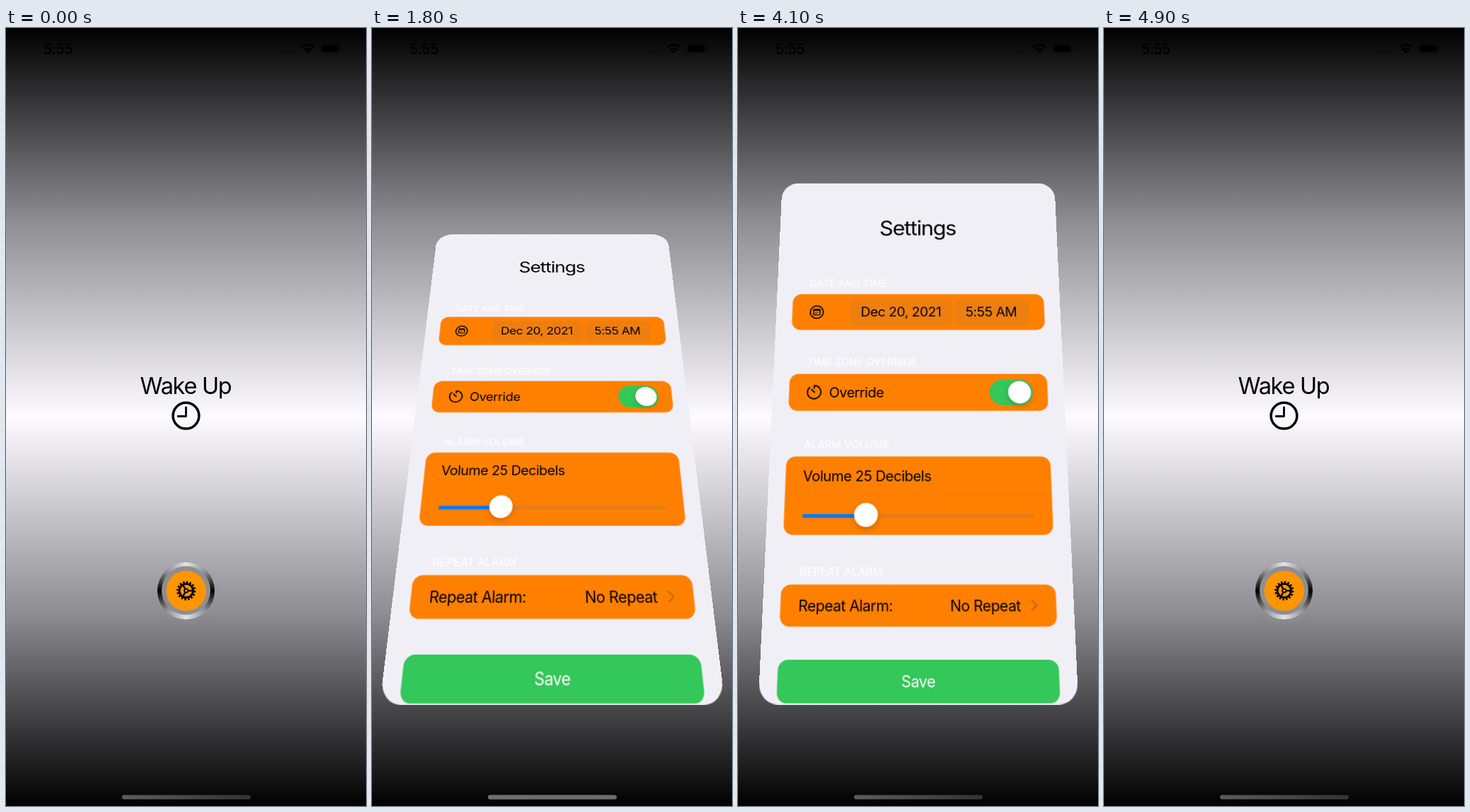
Recreate the animation shown at these times as an HTML page. Size 509x1101 px, loop 5000 ms.

```html
<!DOCTYPE html>
<html lang="en">
<head>
<meta charset="utf-8">
<title>Alarm settings</title>
<style>
  html, body { margin: 0; width: 100%; height: 100%; overflow: hidden; background: #000; }
  #stage {
    position: relative; width: 509px; height: 1101px; overflow: hidden;
    background: linear-gradient(#000, #8e8e93 25%, #fdfbff 50%, #8e8e93 75%, #000);
  }
  #stage > * { position: absolute; }
  svg { display: block; font: 20px Inter, Roboto, sans-serif; letter-spacing: -.025em; }
  #scene { left: 0; top: 0; }
  #ring {
    left: 214px; top: 755.5px; width: 81px; height: 81px; border-radius: 50%;
    background: conic-gradient(#e4e2e6, #8e8e93 12.5%, #000 25%, #8e8e93 37.5%, #e4e2e6 50%,
      #8e8e93 62.5%, #000 75%, #8e8e93 87.5%, #e4e2e6);
    box-shadow: 0 3px 8px rgba(150, 150, 155, .35);
  }
  #card {
    left: 46.5px; top: 187px; border-radius: 26px; overflow: hidden;
    background: #f1eff6; visibility: hidden;
  }
  .title { font-size: 32.5px; letter-spacing: -.04em; text-anchor: middle; }
  .head { font-size: 15px; letter-spacing: 0; fill: #fff; }
  .mid { text-anchor: middle; }
  .row { fill: #ff8000; }
  .pill { fill: rgba(118, 118, 128, .13); }
  .line { fill: none; stroke: #000; stroke-linecap: round; stroke-linejoin: round; }
  .knob { fill: #fff; filter: drop-shadow(0 3px 4px rgba(0, 0, 0, .2)); }
</style>
</head>
<body>
<div id="stage">
  <div id="ring"></div>

  <svg id="scene" width="509" height="1101" viewBox="0 0 509 1101">
    <defs>
      <linearGradient id="bar">
        <stop stop-color="#5c5c5c"/><stop offset="1" stop-color="#333"/>
      </linearGradient>
    </defs>

    <!-- status bar -->
    <text x="53" y="36.5" font-size="20" font-weight="600">5:55</text>
    <g opacity=".5">
      <circle cx="388" cy="34" r="1.6"/><circle cx="394.5" cy="34" r="1.6"/>
      <circle cx="401" cy="34" r="1.6"/><circle cx="407.5" cy="34" r="1.6"/>
    </g>
    <g fill="none" stroke="#000" stroke-width="3">
      <path d="M417.5 27.5a12.8 12.8 0 0 1 18 0M421 31.2a8 8 0 0 1 11 0"/>
      <path d="M426.5 36.5l-3-3a4.4 4.4 0 0 1 6 0z" fill="#000" stroke="none"/>
    </g>
    <rect x="444.5" y="22.5" width="28" height="13.5" rx="4" fill="none" stroke="#000" opacity=".5"/>
    <rect x="446.5" y="24.5" width="24" height="9.5" rx="2.5"/>
    <path d="M474 27v4.500q1.700-.8 1.700-2.250T474 27z" opacity=".5"/>

    <!-- wake up -->
    <text class="title" x="254" y="518">Wake Up</text>
    <circle class="line" cx="254.5" cy="548.7" r="18.400" stroke-width="3.500"/>
    <path class="line" d="M254.500 537v12.500h-11.300" stroke-width="2.800"/>

    <!-- settings button -->
    <circle cx="254.500" cy="796" r="34.500" fill="#8e8e91"/>
    <circle cx="254.800" cy="796.500" r="28.300" fill="#ff9500"/>
    <g id="gear" transform="translate(254.800 796.300)" fill="none" stroke="#000">
      <circle r="9.700" stroke-width="2.800"/>
      <circle r="12.200" stroke-width="2.800" pathLength="32" stroke-dasharray="1.050 .95"/>
      <circle r="2.600" stroke-width="1.800"/>
      <path d="M3 0h6.500M-1.500 2.600l-3.250 5.600M-1.500-2.600l-3.250-5.600" stroke-width="2.300"/>
    </g>

    <!-- home indicator -->
    <rect x="164" y="1085.500" width="182" height="6" rx="3" fill="url(#bar)"/>
    <rect id="glow" x="164" y="1085.500" width="182" height="6" rx="3" fill="#707070" opacity="0"/>
  </svg>

  <svg id="card" width="416" height="743" viewBox="46.5 187 416 743">
    <text class="title" x="253.500" y="273">Settings</text>

    <text class="head" x="94" y="355">DATE AND TIME</text>
    <rect class="row" x="70" y="366.500" width="369" height="55" rx="13"/>
    <rect class="pill" x="155" y="374.500" width="149.500" height="40.500" rx="9"/>
    <rect class="pill" x="308.500" y="374.500" width="107.500" height="40.500" rx="9"/>
    <g class="line" stroke-width="1.800">
      <circle cx="105.800" cy="394.300" r="9.600"/>
      <rect x="101" y="390" width="9.600" height="8.600" rx="1.500" stroke-width="1.400"/>
      <path d="M101.500 391.200h8.600" stroke-width="2"/>
      <path d="M103.300 394.500h5.400M103.300 396.600h4" stroke-width="1" stroke-dasharray=".4 1.600"/>
    </g>
    <text x="170" y="401.500">Dec 20, 2021</text>
    <text x="323.500" y="401.500">5:55 AM</text>

    <text class="head" x="94" y="475.500">TIME ZONE OVERRIDE</text>
    <rect class="row" x="70" y="487.500" width="369" height="54" rx="13"/>
    <path class="line" d="M105.800 508.500v-3.800a9.600 9.600 0 1 1-6.800 2.800M101.800 510.200l4.300 4.300" stroke-width="1.900"/>
    <text x="127" y="521.800">Override</text>
    <rect x="356" y="495.700" width="62" height="37.500" rx="18.750" fill="#34c759"/>
    <circle class="knob" cx="399" cy="514.400" r="16.300"/>

    <text class="head" x="94" y="595">ALARM VOLUME</text>
    <rect class="row" x="70" y="606.500" width="369" height="107.500" rx="13"/>
    <text x="94" y="641.300">Volume 25 Decibels</text>
    <path d="M94 660h345" stroke="#f17c0c"/>
    <rect x="95" y="686" width="319" height="5" rx="2.500" fill="rgba(120,120,128,.2)"/>
    <rect x="95" y="686" width="88" height="5" rx="2.500" fill="#007aff"/>
    <circle class="knob" cx="182.500" cy="687" r="16.300"/>

    <text class="head" x="94" y="768">REPEAT ALARM</text>
    <rect class="row" x="70" y="779.500" width="369" height="54" rx="13"/>
    <text x="94" y="813.800">Repeat Alarm:</text>
    <text x="297" y="813.800">No Repeat</text>
    <path class="line" d="M406.500 800l6.300 6.300-6.300 6.300" stroke-width="2.300" style="stroke:rgba(60,60,67,.3)"/>

    <rect x="70" y="875" width="369" height="53.500" rx="13" fill="#34c759"/>
    <text class="mid" x="254.500" y="909" fill="#fff">Save</text>
  </svg>
</div>

<script>
  const LOOP = 5000, TICK = 100, TURN = 1000, OPEN = 1155, CLOSE = 3875, DEPTH = 743;
  const [card, gear, glow] = ['card', 'gear', 'glow'].map(id => document.getElementById(id));
  const clamp = v => Math.min(1, Math.max(0, v));

  // cubic-bezier(.42, 0, .58, 1)
  function easeInOut(x) {
    let lo = 0, hi = 1;
    for (let i = 0; i < 20; i++) {
      const p = (lo + hi) / 2, q = 1 - p;
      if (1.26 * p * q * q + 1.74 * p * p * q + p * p * p < x) lo = p; else hi = p;
    }
    return lo * lo * (3 - 2 * lo);
  }

  function pose(t) {
    const shown = easeInOut(clamp((t - OPEN) / TURN));
    const gone = easeInOut(clamp((t - CLOSE) / TURN));
    const angle = 90 * (1 - shown + gone);
    const size = 1 - .233 * (1 - shown) - .35 * Math.max(0, t - 4300) / 1000;
    const open = t > OPEN && t < CLOSE + TURN;
    card.style.visibility = open ? 'visible' : 'hidden';
    card.style.transform = angle < .01 ? 'none'
      : `scale(${size}) perspective(${DEPTH}px) rotateX(${angle}deg)`;

    gear.style.opacity = t < 1100 ? 1 : .27 + .73 * clamp((t - 1100) / 300);
    glow.style.opacity = clamp(1.5 - Math.abs(t - 1600) / 350);
  }

  function draw(now) {
    pose(Math.floor(now % LOOP / TICK) * TICK);
    requestAnimationFrame(draw);
  }
  requestAnimationFrame(draw);
</script>
</body>
</html>
```
